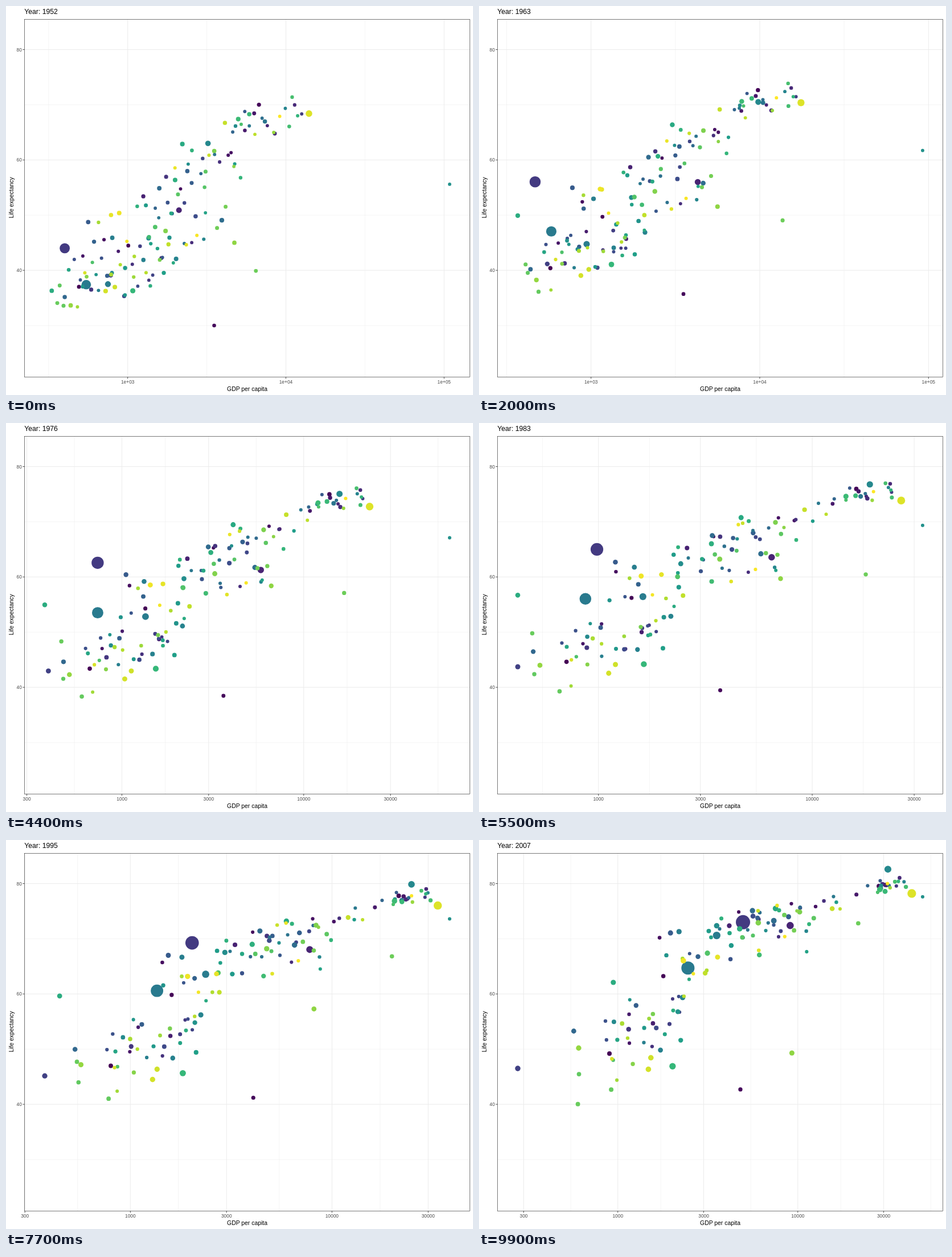
An HTML page for the animation above (10000 ms loop, 820x683 px).

```html
<!DOCTYPE html>
<html lang="en">
<head>
<meta charset="utf-8">
<title>Life expectancy and GDP</title>
<style>
html, body { margin: 0; width: 100%; height: 100%; overflow: hidden; background: #fff; }
svg { display: block; width: 100vw; height: 100vh; }
text { font-family: "Liberation Sans", Arial, sans-serif; fill: #000; }
.tick { font-size: 8.4px; fill: #4d4d4d; }
.name { font-size: 10.4px; text-anchor: middle; }
.major { stroke: #ebebeb; stroke-width: 1; }
.minor { stroke: #ebebeb; stroke-width: .5; }
.mark { stroke: #333; stroke-width: .9; }
</style>
</head>
<body>
<svg viewBox="0 0 820 683">
  <rect width="820" height="683" fill="#fff"/>
  <g id="rows"></g>
  <g id="cols"></g>
  <g id="dots"></g>
  <rect x="32.5" y="23.5" width="782" height="628" fill="none" stroke="#333" stroke-width=".65"/>
  <text id="year" x="32.3" y="14" font-size="12.2"></text>
  <text class="name" x="423.5" y="675.5">GDP per capita</text>
  <text class="name" transform="translate(12.5 336.5) rotate(-90)">Life expectancy</text>
</svg>
<script>
const LEFT = 32.5, RIGHT = 814.5, TOP = 23.5, BOTTOM = 651.5;
const PAD = (RIGHT - LEFT) / 22;
const FIRST = 1952, SPAN = 55, COUNT = 142, STEPS = 100;
const $ = id => document.getElementById(id);
const log = Math.log10;
const mix = (a, b, s) => a + (b - a) * s;

// log of a value that runs through [year, value] points
function logAlong(points, year) {
  let k = 1;
  while (k < points.length - 1 && points[k][0] < year) k++;
  const [[y0, a], [y1, b]] = [points[k - 1], points[k]];
  return mix(log(a), log(b), (year - y0) / (y1 - y0));
}

// poorest and richest income, which set the range of the axis
const low = [[1952, 299], [1958.5, 366], [1962, 355], [1963.7, 375], [1967, 349], [1975, 365],
  [1982, 424], [1992, 347], [1994.6, 382], [1997, 312], [2002, 241], [2007, 278]];
const high = [[1952, 108382], [1957, 113523], [1967, 80895], [1972, 109348], [1977, 59265],
  [1982, 33693], [1985, 29425], [1992, 34933], [1997, 41283], [2007, 49357]];

const ramp = ['440154', '482878', '3e4a89', '31688e', '26828e', '1f9e89',
  '35b779', '6ece58', 'b5de2b', 'fde725'].map(h => [0, 2, 4].map(k => parseInt(h.substr(k, 2), 16)));
function colour(rank) {
  const p = rank / (COUNT - 1) * (ramp.length - 1), k = Math.min(ramp.length - 2, Math.floor(p));
  return `rgb(${ramp[k].map((c, j) => Math.round(mix(c, ramp[k + 1][j], p - k)))})`;
}

const dots = [];

// from (g0, l0) to (g1, l1); g is log income, l is life, the bends ease each one.
// Where life hardly gains in the end, it rises and falls back.
function addDot(rank, pop, g0, l0, g1, l1, bendG = .85, bendL = .8) {
  const hump = l1 - l0 < 6 ? 12 : 0;
  dots.push({
    rank,
    income: s => mix(g0, g1, s ** bendG),
    life: s => mix(l0, l1, s ** bendL) + hump * Math.sin(Math.PI * s ** 1.2),
    radius: s => 2.7 + .27 * Math.sqrt(pop * mix(.6, 1.5, s))
  });
}

// the largest dots and those far from the rest:
// colour rank, population, income and life at both ends, bends
[
  [24, 880, 400, 44, 4959, 73, 1.75, .55],
  [58, 720, 547, 37.4, 2452, 64.7, 2, .65],
  [134, 220, 13990, 68.4, 42952, 78.2, 1, 1],
  [66, 105, 3217, 63, 31656, 82.6, .45, .6],
  [59, 145, 750, 37.5, 3541, 70.6, 1.2, .95],
  [14, 120, 2109, 50.9, 9066, 72.4, .45, .9],
  [94, 80, 1077, 36.3, 2014, 46.9, .7, .5],
  [71, 1, 120000, 55.6, 120000, 77.6, 1, .8],
  [87, 32, 331, 36.3, 944, 62.1, 5, .4],
  [27, 40, 781, 39.1, 200, 46.5],
  [3, 8, 3521, 30, 4797, 42.7, 3, .5],
  [109, 12, 6460, 39.9, 21655, 72.8, .3, .8],
  [117, 30, 4725, 45, 9270, 49.3]
].forEach(([rank, pop, g0, l0, g1, l1, ...bends]) =>
  addDot(rank, pop, log(g0), l0, log(g1), l1, ...bends));

let seed = 1952;
function rand() {
  seed = (seed * 1664525 + 1013904223) % 4294967296;
  return seed / 4294967296;
}
const jitter = width => (rand() - .5) * width;

// centre and spread of log income and of life, at the start and at the end
const crowds = [
  { size: 20, from: [3.88, .24, 67.5, 4.5], to: [4.5, .15, 79.5, 2] },
  { size: 14, from: [3.55, .28, 62, 6], to: [4.08, .3, 75.5, 3.5] },
  { size: 24, from: [3.4, .32, 53, 11], to: [3.8, .34, 72.5, 5] },
  { size: 27, from: [3.1, .42, 46, 9], to: [3.6, .55, 68.5, 8] },
  { size: 44, from: [2.93, .38, 39.5, 6.5], to: [3.12, .42, 53, 12] }
];

const used = new Set(dots.map(d => d.rank));
const spare = [...Array(COUNT).keys()].filter(k => !used.has(k));
for (const { size, from: [g0, gs0, l0, ls0], to: [g1, gs1, l1, ls1] } of crowds) {
  for (let k = 0; k < size; k++) {
    const wealth = 2 * (k + rand()) / size - 1;
    const later = wealth * .7 + jitter(.7);
    const health = wealth * .4 + jitter(1.4);
    const laterHealth = later * .3 + health * .35 + jitter(1.1);
    const [rank] = spare.splice(Math.floor(rand() * spare.length), 1);
    addDot(rank, 1 + 45 * rand() ** 3, g0 + gs0 * wealth, l0 + ls0 * health,
      g1 + gs1 * later, l1 + ls1 * laterHealth);
  }
}

dots.sort((a, b) => a.rank - b.rank);
for (const d of dots) {
  d.node = document.createElementNS('http://www.w3.org/2000/svg', 'circle');
  d.node.setAttribute('fill', colour(d.rank));
  $('dots').append(d.node);
}

const lifeY = life => 76.5 + (80 - life) * 9.69;
const line = (kind, x1, y1, x2, y2) => `<line class="${kind}" x1="${x1}" y1="${y1}" x2="${x2}" y2="${y2}"/>`;

$('rows').innerHTML =
  [70, 50, 30].map(v => line('minor', LEFT, lifeY(v), RIGHT, lifeY(v))).join('') +
  [80, 60, 40].map(v => line('major', LEFT, lifeY(v), RIGHT, lifeY(v)) +
    line('mark', LEFT - 3, lifeY(v), LEFT, lifeY(v)) +
    `<text class="tick" x="27.8" y="${lifeY(v) + 3}" text-anchor="end">${v}</text>`).join('');

// whole decades while 1e+05 is in view, otherwise thirds as well
function drawColumns(toX) {
  const inside = x => x > LEFT && x < RIGHT;
  const wide = toX(5) < RIGHT;
  const breaks = [2, 3, 4, 5, 6].flatMap(d => wide ? [d] : [d, d + log(3)]);
  let minor = '', major = '';
  breaks.forEach((b, k) => {
    const x = toX(b), mid = (x + toX(breaks[k - 1])) / 2;
    if (inside(mid)) minor += line('minor', mid, TOP, mid, BOTTOM);
    if (!inside(x)) return;
    const label = wide ? '1e+0' + b : Math.round(10 ** b);
    major += line('major', x, TOP, x, BOTTOM) + line('mark', x, BOTTOM, x, BOTTOM + 3) +
      `<text class="tick" x="${x}" y="663" text-anchor="middle">${label}</text>`;
  });
  $('cols').innerHTML = minor + major;
}

function draw(step) {
  const s = step / (STEPS - 1), year = FIRST + SPAN * s;
  const lo = logAlong(low, year), hi = logAlong(high, year);
  const toX = g => mix(LEFT + PAD, RIGHT - PAD, (g - lo) / (hi - lo));
  $('year').textContent = 'Year: ' + Math.round(year);
  drawColumns(toX);
  for (const { income, life, radius, node } of dots) {
    const g = Math.min(hi, Math.max(lo, income(s)));
    node.setAttribute('cx', toX(g).toFixed(2));
    node.setAttribute('cy', lifeY(life(s)).toFixed(2));
    node.setAttribute('r', radius(s).toFixed(2));
  }
}

let shown = -1;
const start = performance.now();
function tick() {
  const step = Math.floor((performance.now() - start) / 100) % STEPS;
  if (step !== shown) draw(shown = step);
  requestAnimationFrame(tick);
}
tick();
</script>
</body>
</html>
```
